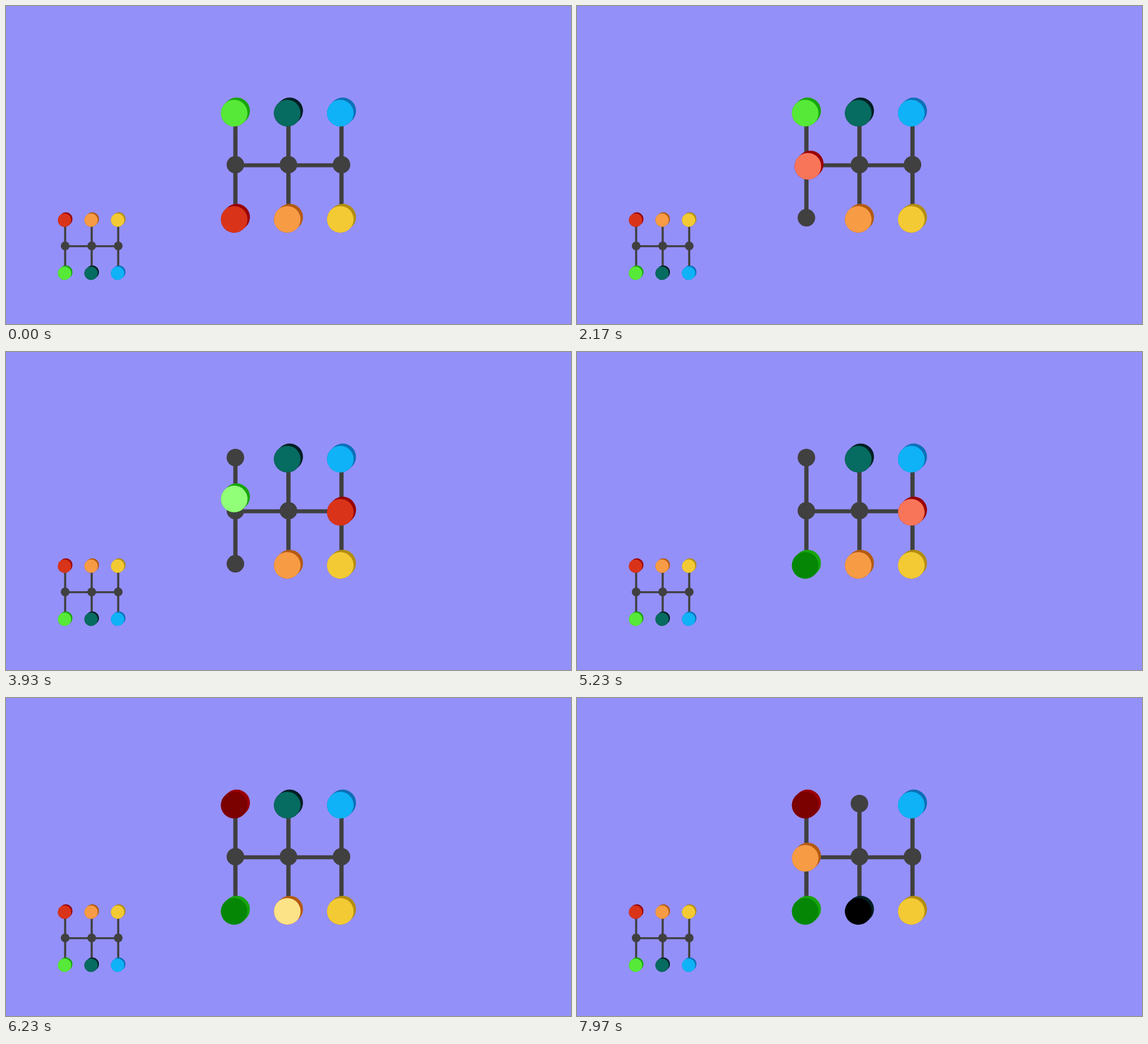
Animation, 998 px wide and 561 px high, one loop 8 s. Source, as an HTML page:

```html
<!DOCTYPE html>
<html lang="en">
<head>
<meta charset="utf-8">
<title>Peg puzzle</title>
<style>
  html, body { margin: 0; width: 100%; height: 100%; overflow: hidden; background: #9490f9; }
  svg { display: block; width: 100%; height: 100%; }
  line { stroke-linecap: round; }
</style>
</head>
<body>
<svg viewBox="0 0 998 561">
  <g id="goal" transform="translate(-98.1 283.3) scale(.5)"></g>
  <g id="board"></g>
</svg>
<script>
const LOOP = 8000;
const STEP = 200; // ms to travel one link
const PITCH = 93.7;
const LEFT = 405.2, TOP = 186.2;

// Positions are [column, row]; a move follows its path at constant speed.
const pieces = [
  { home: [0, 0], goal: [0, 2], face: '#57e937', side: '#17a50c', bright: '#91ff78', locked: '#058705',
    moves: [{ select: 3150, start: 3780, path: [[0, 0], [0, 1], [0, 2]], lock: true }] },
  { home: [1, 0], goal: [1, 2], face: '#066b60', side: '#021f25', bright: '#48ab9f', locked: '#000000',
    moves: [{ select: 7200, start: 7482, path: [[1, 0], [1, 1], [1, 2]], lock: true }] },
  { home: [2, 0], goal: [2, 2], face: '#0fb2f6', side: '#0d70b8', moves: [] },
  { home: [0, 2], goal: [0, 0], face: '#d93419', side: '#980004', bright: '#f87559', locked: '#7b0000',
    moves: [
      { select: 1450, start: 1960, path: [[0, 2], [0, 1], [1, 1], [2, 1]] },
      { select: 4700, start: 5235, path: [[2, 1], [1, 1], [0, 1], [0, 0]], lock: true }
    ] },
  { home: [1, 2], goal: [1, 0], face: '#f79b45', side: '#b45a10', bright: '#fce388',
    moves: [{ select: 6150, start: 6600, path: [[1, 2], [1, 1], [0, 1]] }] },
  { home: [2, 2], goal: [2, 0], face: '#f3ca34', side: '#b38d10', moves: [] }
];

function add(parent, tag, attrs) {
  const node = document.createElementNS('http://www.w3.org/2000/svg', tag);
  for (const key in attrs) node.setAttribute(key, attrs[key]);
  return parent.appendChild(node);
}

const place = ([col, row]) => `translate(${LEFT + col * PITCH} ${TOP + row * PITCH})`;

function drawFrame(parent) {
  const grid = add(parent, 'g', { fill: '#404040', stroke: 'none' });
  const link = { stroke: '#404040', 'stroke-width': 7.5 };
  const midY = TOP + PITCH + 1;
  add(grid, 'line', { x1: LEFT, y1: midY, x2: LEFT + 2 * PITCH, y2: midY, ...link, 'stroke-width': 7 });
  for (let col = 0; col < 3; col++) {
    const x = LEFT + col * PITCH;
    add(grid, 'line', { x1: x, y1: TOP, x2: x, y2: TOP + 2 * PITCH, ...link });
    for (let row = 0; row < 3; row++)
      add(grid, 'circle', { r: 15.5, transform: place([col, row]) });
  }
}

function drawPiece(parent, piece, at) {
  const group = add(parent, 'g', { transform: place(at) });
  add(group, 'line', { x1: -2.1, y1: 2.8, x2: 2.2, y2: -1.2, stroke: piece.side, 'stroke-width': 47 });
  const face = add(group, 'circle', { cx: -2.1, cy: 2.8, r: 23.5, fill: piece.face });
  return { group, face };
}

function stateAt(piece, t) {
  let at = piece.home, color = piece.face;
  for (const { select, start, path, lock } of piece.moves) {
    if (t < select) break;
    const last = path.length - 1;
    const progress = Math.min(Math.max((t - start) / STEP, 0), last);
    const i = Math.min(Math.floor(progress), last - 1);
    at = path[i].map((v, axis) => v + (path[i + 1][axis] - v) * (progress - i));
    color = progress < last ? piece.bright : lock ? piece.locked : piece.face;
  }
  return { at, color };
}

const goal = document.getElementById('goal');
const board = document.getElementById('board');
drawFrame(goal);
drawFrame(board);
for (const piece of pieces) {
  drawPiece(goal, piece, piece.goal);
  piece.view = drawPiece(board, piece, piece.home);
}

let origin;
function tick(now) {
  origin ??= now;
  const t = (now - origin) % LOOP;
  for (const piece of pieces) {
    const { at, color } = stateAt(piece, t);
    piece.view.group.setAttribute('transform', place(at));
    piece.view.face.setAttribute('fill', color);
  }
  requestAnimationFrame(tick);
}
requestAnimationFrame(tick);
</script>
</body>
</html>
```
